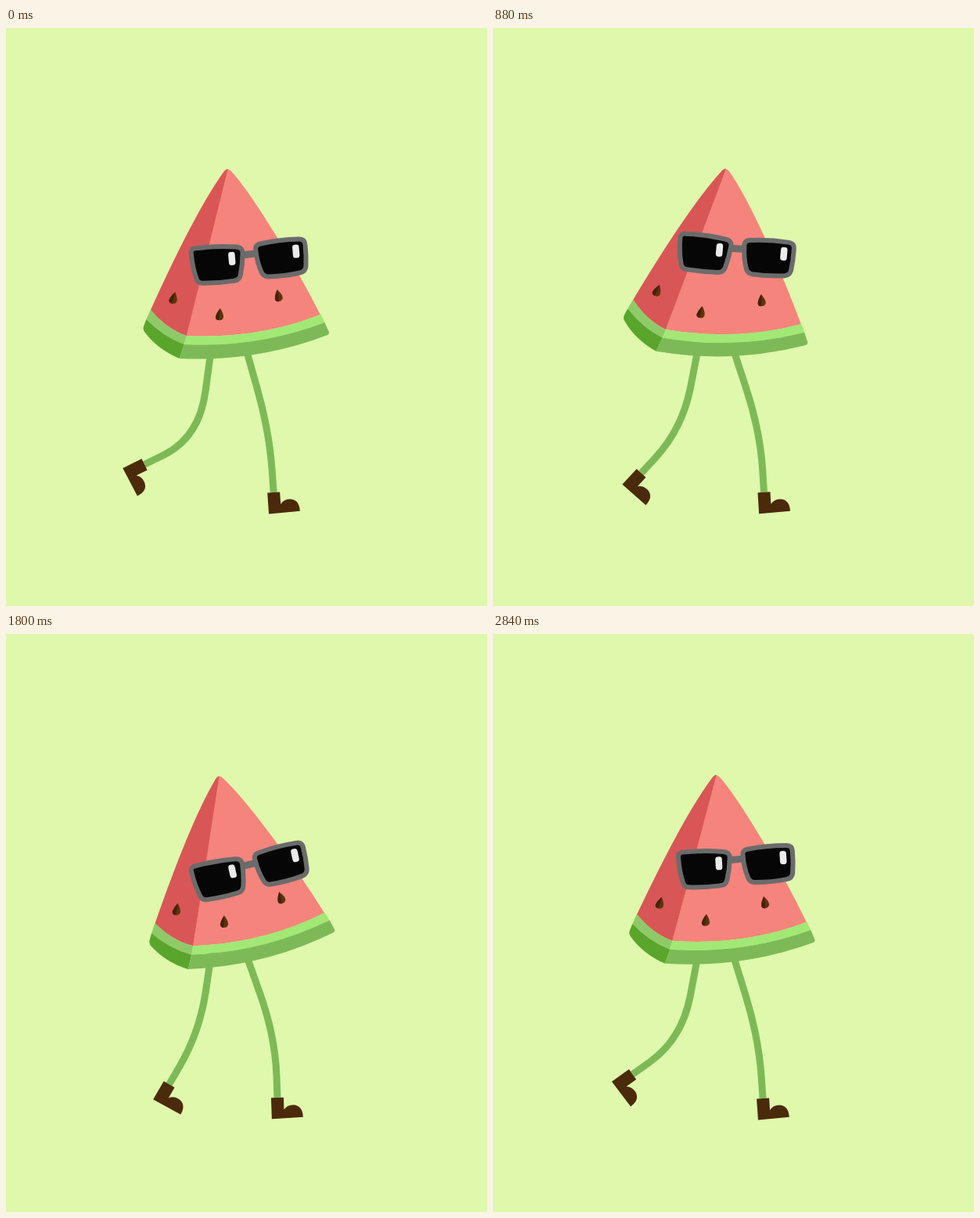
Animation of 615x738 px, one loop 2940 ms. Source, as an HTML page:

```html
<!DOCTYPE html>
<html lang="en">
<head>
<meta charset="utf-8">
<title>Walking watermelon</title>
<style>
  html, body { margin: 0; width: 100%; height: 100%; overflow: hidden; background: #dff8ab; }
  svg { display: block; width: 100%; height: 100%; }
  .leg { fill: none; stroke: #7dba57; stroke-width: 9; }
  .boot { fill: #4a2a0b; }
  .lens { fill: #060606; stroke: #6b6b6b; stroke-width: 6; stroke-linejoin: round; }
</style>
</head>
<body>
<svg viewBox="0 0 615 738">
  <defs>
    <g id="seed">
      <path fill="#5f330d" d="M1 -8 Q6 0 5 4 Q3 8 -1 7 Q-5 7 -5 3 Q-4 -2 1 -8Z"/>
      <path fill="#45230a" d="M1 -8 Q1 0 -1 7 Q-5 7 -5 3 Q-4 -2 1 -8Z"/>
    </g>
  </defs>
  <rect width="615" height="738" fill="#dff8ab"/>
  <g id="legs"></g>
  <g id="slice">
    <path fill="#f5847c" d="M282 181 Q284 179 288 183 Q309 206 347 268 Q377 317 402 366 Q323 397.5 231 393Z"/>
    <path fill="#d95656" d="M283.5 180 Q281 180 278 184 Q242 234 185 360 Q205 384 231 393Z"/>
    <path fill="#8ecb68" d="M185 359.5 Q205 384 231 393 L228 404 Q201 394 179.5 372Z"/>
    <path fill="#5aa52c" d="M179.5 372 Q201 394 228 404 L222 422 Q193 410 176.5 387 Q175 384 176 381Z"/>
    <path fill="#a2e875" d="M231 393 Q323 397.5 402.5 365.5 L407.5 376 Q320 409 228 404Z"/>
    <path fill="#7dba57" d="M228 404 Q320 409 407.5 376 L413 388 Q413.5 391 411 392 Q320 427 222 422Z"/>
    <use href="#seed" transform="translate(214 345) rotate(10)"/>
    <use href="#seed" transform="translate(273 366)"/>
    <use href="#seed" transform="translate(348 342) rotate(-16)"/>
  </g>
  <g id="glasses">
    <path d="M301 290 L319 288" stroke="#6b6b6b" stroke-width="9"/>
    <path class="lens" d="M237 290 Q235 282 243 281.5 Q268 278 294 279.5 Q303 280 302.5 288 Q302.5 302 300 315 Q298.5 322.5 291 323 Q272 326 251 326 Q245 326 243.5 320 Q238.5 306 237 290Z"/>
    <path class="lens" d="M319.5 285 Q317.5 277 325 275.5 Q350 270 375 269.5 Q382 269.5 382.5 277 Q384 291 383.5 304 Q383 311 376 312.5 Q356 317 335 317.5 Q329 317.5 326.5 311.5 Q321 299 319.5 285Z"/>
    <g fill="#ebebeb">
      <rect x="284.5" y="286" width="8.5" height="17" rx="3.5" transform="rotate(-5 289 294)"/>
      <rect x="366.5" y="276.5" width="8.5" height="17" rx="3.5" transform="rotate(-5 371 285)"/>
    </g>
  </g>
</svg>
<script>
const STEP = 40, LAST = 71, LOOP = 2940;
const CYCLE = 24, GROUND = 593, SHIN = 78;
const $ = id => document.getElementById(id);

// The ankle swings from back to front between off and land; it is highest at peak
const legs = [
  { hip: [263, 405], back: 177, front: 341, off: -0.5, land: 10.5, peak: 1.6 },
  { hip: [305.5, 405], back: 188, front: 347, off: 11.75, land: 20, peak: 12.2 }
];

const mix = (a, b, u) => a + (b - a) * u;
const ease = u => (1 - Math.cos(Math.PI * u)) / 2;
const bell = turn => Math.cos(Math.PI * turn) ** 4;

function make(parent, cls) {
  const el = document.createElementNS(parent.namespaceURI, 'path');
  el.setAttribute('class', cls);
  return parent.appendChild(el);
}

for (const leg of legs) {
  leg.line = make($('legs'), 'leg');
  leg.boot = make($('legs'), 'boot');
  leg.boot.setAttribute('d', 'M-8 0 H8 V15.5 Q12 10 20 10 Q32 11 32 26 L-8 27Z');
}

function ankleX({ back, front, off, land }, n) {
  const swing = land - off;
  const since = (n - off + CYCLE) % CYCLE;
  return since < swing
    ? mix(back, front, ease((since / swing) ** 1.4))
    : mix(front, back, ease(((since - swing) / (CYCLE - swing)) ** 1.6));
}

function drawLeg(leg, n) {
  const lift = bell((n - leg.peak) / CYCLE);
  const x = ankleX(leg, n), y = GROUND - 39 * lift;
  const tilt = -4 + 74 * lift, rad = tilt * Math.PI / 180;
  const [hx, hy] = leg.hip;
  const kx = x + SHIN * Math.sin(rad), ky = y - SHIN * Math.cos(rad);

  // Thigh and shin meet in a rounded knee
  leg.line.setAttribute('d', `M${hx} ${hy} L${mix(kx, hx, 0.5)} ${mix(ky, hy, 0.5)}
    Q${kx} ${ky} ${mix(kx, x, 0.65)} ${mix(ky, y, 0.65)} L${x} ${y}`);
  leg.boot.setAttribute('transform', `translate(${x} ${y}) rotate(${tilt})`);
}

function draw(time) {
  const n = Math.min(LAST, Math.floor(time % LOOP / STEP));
  for (const leg of legs) drawLeg(leg, n % CYCLE);
  const sway = 1.3 + 7.8 * Math.sin(0.401 * n - 0.16);
  $('slice').setAttribute('transform', `rotate(${sway} 294 303)`);
  $('glasses').setAttribute('transform', `rotate(${sway * 1.5} 352 293)`);
}

const start = performance.now();
function tick() {
  draw(performance.now() - start);
  requestAnimationFrame(tick);
}
tick();
</script>
</body>
</html>
```
